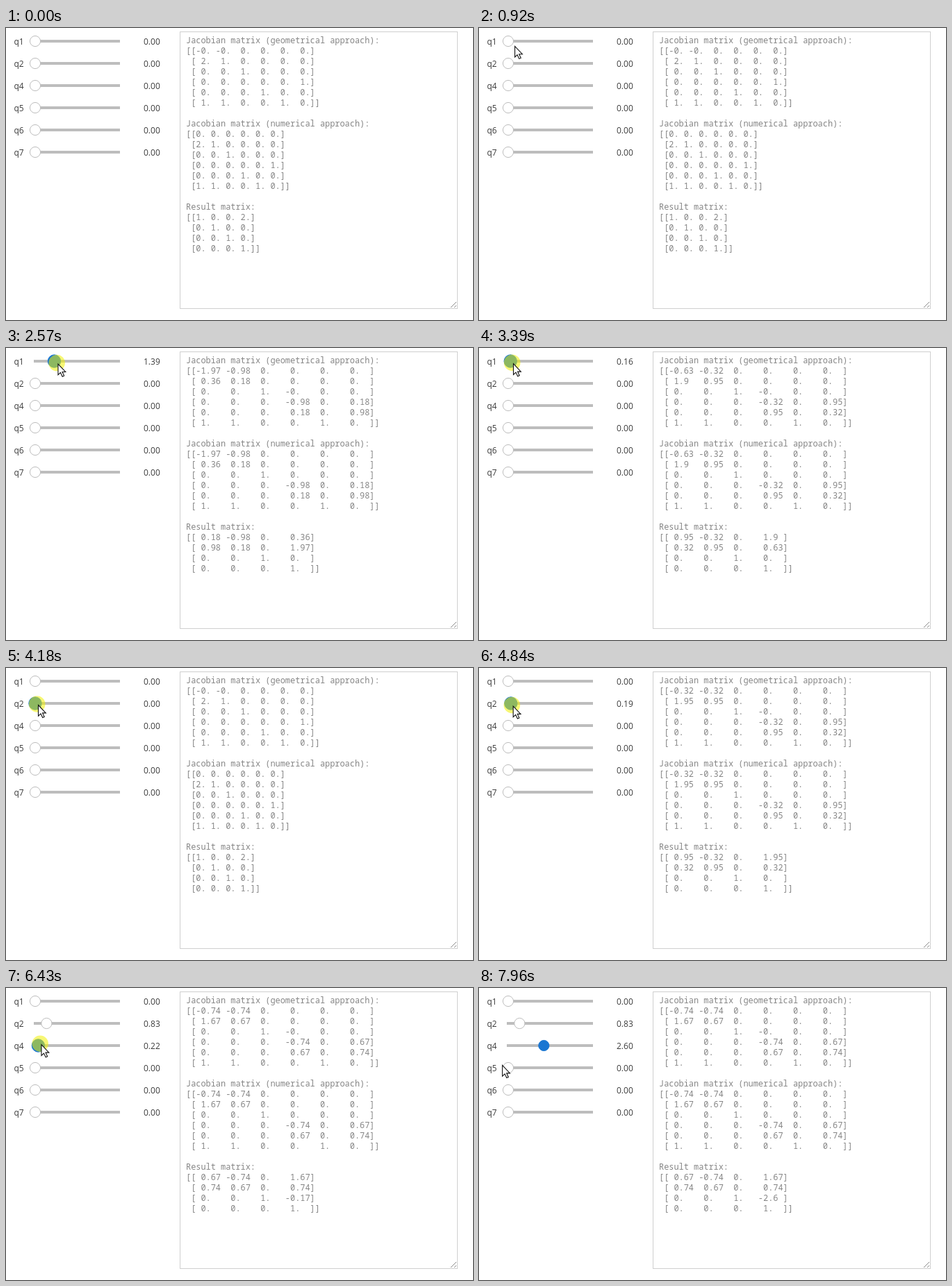
An HTML page that plays this animation: 672x421 px, repeating every 8 s.

```html
<!DOCTYPE html>
<html lang="en">
<head>
<meta charset="utf-8">
<title>Jacobian sliders</title>
<style>
  html, body { margin: 0; width: 100%; height: 100%; overflow: hidden; background: #fff; }
  svg { position: absolute; left: 0; top: 0; }
  .label { font: 12px "Open Sans", "Noto Sans", sans-serif; fill: #3c3c3c; }
  .rail { fill: #bdbdbd; }
  .handle { fill: #fff; stroke: #bdbdbd; }
  .handle.on { fill: #1976d2; stroke: #1976d2; }
  .box { fill: #fff; stroke: #cfcfcf; }
  .grip { stroke: #8a8a8a; fill: none; }
  #press { fill: #f0f000; fill-opacity: .54; }
  #cursor path { fill: #fff; stroke: #111; stroke-width: 1.1; }
  pre {
    position: absolute; left: 259px; top: 10px; margin: 0;
    font: 11.91px/15px "Noto Sans Mono", "DejaVu Sans Mono", monospace;
    color: #858585;
  }
</style>
</head>
<body>
<svg width="672" height="421" viewBox="0 0 672 421">
  <rect class="box" x="250.5" y="5.5" width="399" height="399"/>
  <path class="grip" d="M640 403L648 395M645 403L648 400"/>
  <g id="sliders"></g>
</svg>
<pre id="output"></pre>
<svg width="672" height="421" viewBox="0 0 672 421">
  <circle id="press" r="11.8"/>
  <g id="cursor"><path d="M.5 .5V16.2L4 12.9L6.7 18.6L9.2 17.5L6.6 11.9H11.3Z"/></g>
</svg>
<script>
const LOOP = 8000;
const TICK = 66, PHASE = 22; // screen refresh
const LAG = 60;              // the matrices trail the sliders
const LEAD = 30;             // the pointer runs ahead of them
const PX_PER_UNIT = 124 / (2 * Math.PI);
const NAMES = ['q1', 'q2', 'q4', 'q5', 'q6', 'q7'];

// The pointer travels to each stop, presses there and drags.
// A move is [start, end, slider value].
const START = { time: 130, x: 598, y: 400 };
const STOPS = [
  { travel: [130, 920], x: 47, y: 23, drift: -1, down: 1580, up: 3780,
    moves: [[1680, 1740, .12], [1840, 2470, 1.39], [2905, 3520, 0]] },
  { travel: [3780, 4040], x: 46, y: 53, drift: 4, down: 4180, up: 5930,
    moves: [[4215, 4380, .6], [4580, 5000, 0], [5000, 5240, .17], [5506, 5703, .83]] },
  { travel: [5930, 6220], x: 44, y: 80, drift: 7, down: 6240, up: 7290,
    moves: [[6240, 6360, .17], [6386, 6824, 2.6]] },
  { travel: [7290, 7960], x: 33, y: 111, down: Infinity, moves: [] }
];

const $ = id => document.getElementById(id);
const mix = (a, b, u) => a + (b - a) * u;
const ramp = (t, a, b) => Math.min(1, Math.max(0, (t - a) / (b - a)));

function ease(t, a, b) {
  const u = ramp(t, a, b);
  return u * u * (3 - 2 * u);
}

function add(tag, attrs, text = '') {
  const el = document.createElementNS('http://www.w3.org/2000/svg', tag);
  for (const key in attrs) el.setAttribute(key, attrs[key]);
  el.textContent = text;
  return $('sliders').appendChild(el);
}

const sliders = NAMES.map((name, i) => {
  const y = 19 + 32 * i;
  add('text', { class: 'label', x: 11.5, y: y + 5 }, name);
  add('rect', { class: 'rail', x: 40, y: y - 2, width: 124, height: 4 });
  return {
    y,
    handle: add('circle', { cy: y }),
    value: add('text', { class: 'label', x: 198, y: y + 5 })
  };
});

function joint(i, t) {
  const moves = STOPS[i] ? STOPS[i].moves : [];
  return moves.reduce((q, [a, b, to]) => mix(q, to, ease(t, a, b)), 0);
}

function pointer(t) {
  let { x, y } = START;
  STOPS.forEach((stop, i) => {
    const u = ease(t, ...stop.travel);
    x = mix(x, stop.x, u);
    y = mix(y, stop.y, u);
    if (t >= stop.down) {
      x += PX_PER_UNIT * joint(i, Math.min(t, stop.up) + LEAD);
      y += stop.drift * ramp(t, stop.down, stop.up);
    }
  });
  return [x, y];
}

// Array layout in the manner of NumPy with two decimals.
function format(rows) {
  const cells = rows.map(row => row.map(v => v.toFixed(2).replace(/0+$/, '').split('.')));
  const width = side => Math.max(...cells.flat().map(c => c[side].length));
  const left = width(0), right = width(1);
  const lines = cells.map(row =>
    row.map(([a, b]) => a.padStart(left) + '.' + b.padEnd(right)).join(' '));
  return '[[' + lines.join(']\n [') + ']]';
}

function report(q1, q2, q4) {
  const angle = q1 + q2;
  const s = Math.sin(angle), c = Math.cos(angle);
  const x = Math.cos(q1) + c, y = Math.sin(q1) + s;
  // A tiny negative offset prints as "-0."
  const jacobian = tiny => [
    [-y - tiny, -s - tiny, 0, 0, 0, 0],
    [x, c, 0, 0, 0, 0],
    [0, 0, 1, -tiny * s, 0, 0],
    [0, 0, 0, -s, 0, c],
    [0, 0, 0, c, 0, s],
    [1, 1, 0, 0, 1, 0]
  ];
  const pose = [[c, -s, 0, x], [s, c, 0, y], [0, 0, 1, -q4], [0, 0, 0, 1]];
  return 'Jacobian matrix (geometrical approach):\n' + format(jacobian(1e-9)) +
    '\n\nJacobian matrix (numerical approach):\n' + format(jacobian(0)) +
    '\n\nResult matrix:\n' + format(pose);
}

function draw(time) {
  const t = PHASE + TICK * Math.floor((time - PHASE) / TICK);
  const [px, py] = pointer(t);
  const visible = t >= START.time;
  const focus = STOPS.filter(stop => stop.down <= t).length - 1;
  const down = focus >= 0 && t < STOPS[focus].up;

  sliders.forEach(({ y, handle, value }, i) => {
    const q = joint(i, t);
    const x = 42 + q * PX_PER_UNIT;
    const hover = visible && Math.hypot(px - x, py - y) < 8.5;
    handle.setAttribute('class', hover || i === focus ? 'handle on' : 'handle');
    handle.setAttribute('cx', x);
    handle.setAttribute('r', down && i === focus ? 9.2 : 7.6);
    value.textContent = q.toFixed(2);
  });

  $('output').textContent = report(...[0, 1, 2].map(i => joint(i, t - LAG)));
  $('press').style.display = down ? '' : 'none';
  $('press').setAttribute('transform', `translate(${px - 1.3} ${py - 1})`);
  $('cursor').style.display = visible ? '' : 'none';
  $('cursor').setAttribute('transform', `translate(${px} ${py})`);
}

const origin = performance.now();
function tick() {
  draw((performance.now() - origin) % LOOP);
  requestAnimationFrame(tick);
}
tick();
</script>
</body>
</html>
```
